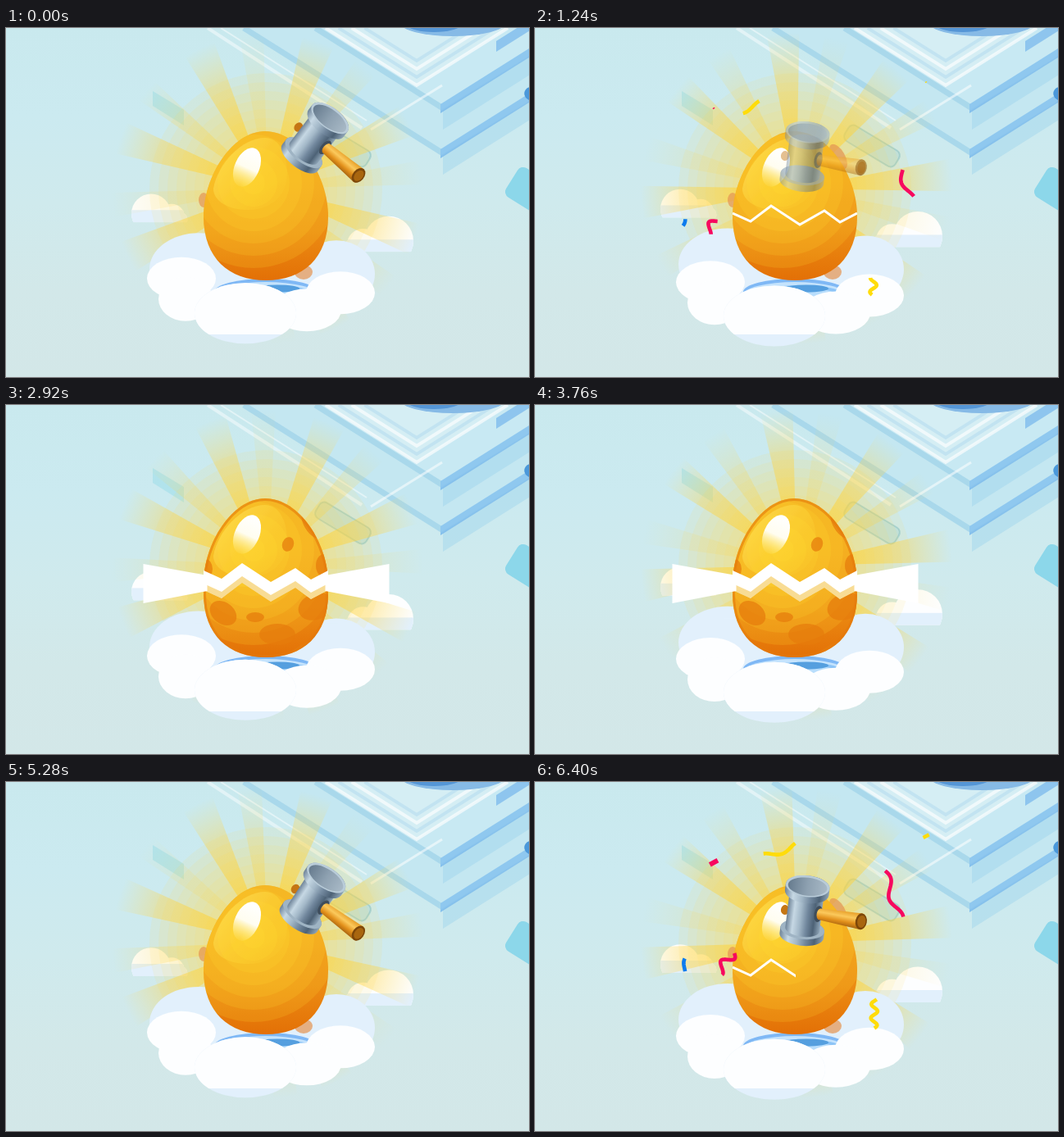
Recreate the animation shown at these times as an HTML page with a canvas. Size 638x426 px, loop 6480 ms.

```html
<!DOCTYPE html>
<html lang="en">
<head>
<meta charset="utf-8">
<title>Golden egg</title>
<style>
html, body { margin: 0; width: 100%; height: 100%; overflow: hidden; background: #cfe9ec; }
canvas { display: block; }
</style>
</head>
<body>
<canvas id="stage" width="638" height="426"></canvas>
<script>
const W = 638, H = 426;
const LOOP = 6480, SPIN = 2660, CYCLE = SPIN * 2;
const WHITE = '#fdfeff', PALE = '#e2f0fc';
const RED = '#f7085f', YELLOW = '#ffdc0a', BLUE = '#0c7bee';
const stage = document.getElementById('stage').getContext('2d');
let g = stage;

const rad = d => d * Math.PI / 180;
const clamp = (v, a = 0, b = 1) => Math.max(a, Math.min(b, v));
const span = (t, a, b) => clamp((t - a) / (b - a));
const smooth = u => u * u * (3 - 2 * u);
const wave = (t, peak) => Math.cos((t - peak) / SPIN * 2 * Math.PI);

function keyed(t, keys) {
  const i = keys.findIndex(k => k[0] > t);
  if (i === 0) return keys[0].slice(1);
  if (i < 0) return keys[keys.length - 1].slice(1);
  const a = keys[i - 1], b = keys[i], u = span(t, a[0], b[0]);
  return a.slice(1).map((v, k) => v + (b[k + 1] - v) * u);
}

function trace(points) {
  g.beginPath();
  points.forEach(([x, y]) => g.lineTo(x, y));
}

function fill(color, points) {
  g.fillStyle = color;
  trace(points);
  g.fill();
}

function stroke(color, width, points) {
  g.strokeStyle = color;
  g.lineWidth = width;
  trace(points);
  g.stroke();
}

function oval(color, x, y, rx, ry = rx, tilt = 0) {
  g.fillStyle = color;
  g.beginPath();
  g.ellipse(x, y, rx, ry, rad(tilt), 0, 7);
  g.fill();
}

function blend(x0, y0, x1, y1, ...stops) {
  const grad = g.createLinearGradient(x0, y0, x1, y1);
  stops.forEach((c, i) => grad.addColorStop(i / (stops.length - 1), c));
  return grad;
}

function within(draw) { g.save(); draw(); g.restore(); }

// ---------- backdrop ----------
const SLOPE = .63;

// both arms rise from the corner at (x, y) to the top and the right side
const corner = (x, y) => [[x - y / SLOPE, 0], [x, y], [x + y / SLOPE, 0]];

// right-hand side wall of a slab, hanging below its edge
const wall = (x, y, h) => {
  const end = y - (W - x) * SLOPE;
  return [[x, y], [W, end], [W, end + h], [x, y + h]];
};

function slab(x, y, top) {
  fill(top, corner(x, y));
  fill('rgba(150,208,236,.4)', wall(x, y + 4, 22));
  stroke('#a9d8eb', 7, corner(x, y).slice(0, 2));
  fill(blend(x, y, x + 8, y + 13, '#8fc8ef', '#4e97dc'), wall(x - 3, y - 5, 11));
}

function backdrop() {
  g.fillStyle = blend(0, 0, 0, H, '#c9e9ee', '#cbeaf0', '#cfeaed', '#d2e8e9', '#d3e7e8');
  g.fillRect(0, 0, W, H);

  slab(533, 153, '#c4e7f1');
  slab(533, 98, '#c8e9f3');
  fill('#d5eef4', corner(501, 70));
  for (let i = 0; i < 4; i++)
    stroke(i % 2 ? 'rgba(190,226,240,.8)' : 'rgba(255,255,255,.65)', 4, corner(501, 70 - i * 10));
  oval('#86bae6', 545, -6, 64, 16);
  oval('#5596d6', 522, -5, 34, 10);
  fill('#8ec5ee', wall(598, 16, 13));

  for (let i = 0; i < 2; i++)
    stroke('rgba(255,255,255,.45)', 4 - i * 2, [[246 + i * 16, 0], [434 + i * 6, 122 - i * 9]]);
  stroke('rgba(255,255,255,.55)', 3, [[445, 124], [532, 70]]);

  // loose tiles
  fill('rgba(130,212,226,.35)', [[179, 77], [217, 100], [217, 119], [179, 95]]);
  const tile = (x, y, w, h, tilt, color, edge) => within(() => {
    g.translate(x, y);
    g.rotate(rad(tilt));
    g.beginPath();
    g.roundRect(-w / 2, -h / 2, w, h, 7);
    g.fillStyle = color;
    g.fill();
    g.lineWidth = 2;
    g.strokeStyle = edge;
    g.stroke();
  });
  tile(411, 144, 72, 22, 31, 'rgba(100,180,200,.18)', 'rgba(95,175,195,.4)');
  tile(640, 199, 52, 40, 32, '#8cd7ea', '#8cd7ea');
  tile(642, 81, 18, 14, 32, '#4b98da', '#4b98da');
}

const scenery = document.createElement('canvas');
scenery.width = W;
scenery.height = H;
g = scenery.getContext('2d');
backdrop();
g = stage;

// ---------- light ----------
function glow(t) {
  const cx = 319, cy = 196, R = 190;
  for (let r = 142; r > 70; r -= 11) oval('rgba(255,216,84,.1)', 317, 197, r);
  const grad = g.createRadialGradient(cx, cy, 60, cx, cy, R);
  grad.addColorStop(0, 'rgba(255,210,50,.6)');
  grad.addColorStop(.6, 'rgba(255,212,66,.38)');
  grad.addColorStop(1, 'rgba(255,220,90,0)');
  g.fillStyle = grad;
  const ray = (deg, width, alpha) => {
    g.globalAlpha = alpha;
    g.beginPath();
    g.moveTo(cx, cy);
    g.arc(cx, cy, R, rad(deg - width / 2 - 90), rad(deg + width / 2 - 90));
    g.fill();
  };
  for (let i = 0; i < 8; i++) {
    const a = -26 + 45 * (i + t % SPIN / SPIN);
    ray(a, 12, 1);
    ray(a + 20, 9, i % 2 ? .55 : .3);
  }
  g.globalAlpha = 1;
}

// ---------- clouds ----------
// one dome with two smaller puffs on its inner side
function smallCloud(x, base, r, side) {
  within(() => {
    g.beginPath();
    for (const [shift, size] of [[0, 1], [1.05, .65], [1.5, .35]]) {
      const cx = x + side * shift * r;
      g.moveTo(cx + size * r, base);
      g.arc(cx, base - size * r * .45, size * r, 0, 7);
    }
    g.clip();
    g.fillStyle = WHITE;
    g.fillRect(0, base - r * 2, W, r * 2);
    g.fillStyle = PALE;
    g.fillRect(0, base - 15, W, 15);
    g.restore();
    g.save();
  });
}

function drift(t, draw) {
  within(() => {
    g.translate(0, wave(t, 320) * 4.5);
    draw();
  });
}

function farClouds() {
  const cut = (x, base, r, side) => within(() => {
    g.beginPath();
    g.rect(0, 0, W, base);
    g.clip();
    smallCloud(x, base, r, side);
  });
  cut(177, 234, 24, 1);
  cut(467, 270, 30, -1);
}

function backCloud() {
  oval(PALE, 235, 291, 60, 44);
  oval(PALE, 403, 297, 47, 41);
  g.fillStyle = PALE;
  g.fillRect(230, 262, 175, 62);
}

function frontCloud(t) {
  const left = wave(t, 1300) * 2.3, mid = wave(t, 1600) * 2.2;
  oval(WHITE, 214, 308 + left, 42, 26);
  oval(WHITE, 219, 333 + left, 33, 27);
  oval(WHITE, 408, 325 + mid, 42, 26);
  oval(WHITE, 367, 346 + mid, 42, 26);
  g.fillStyle = WHITE;
  g.fillRect(220, 328, 160, 22);
  oval(PALE, 292, 350 + mid, 62, 37);
  within(() => {
    g.beginPath();
    g.rect(0, 0, W, 374);
    g.clip();
    oval(WHITE, 292, 350 + mid, 62, 37);
  });
}

function dish() {
  oval('#7fb8f5', 317, 322, 63, 16);
  oval('#c4e3fd', 317, 325, 62, 15);
  oval('#8cc4f7', 324, 323, 48, 9);
  oval('#b9defc', 322, 326, 46, 9);
  oval('#559fdf', 331, 318, 27, 4.5);
}

// ---------- egg ----------
const shell = new Path2D('M316 126C358 126 393 181 393 230C393 281 362 308 317 308' +
  'C272 308 241 281 241 230C241 181 276 126 316 126Z');
const gloss = new Path2D('M316 134C334 134 343 155 343 178C343 205 322 222 295 222' +
  'C272 222 253 212 253 196C258 166 288 134 316 134Z');
const CUT = [[241, 226], [263, 236], [288, 217], [323, 240], [353, 223], [372, 237], [393, 226]];
const cutAt = dy => CUT.map(([x, y]) => [x, y + dy]);

function eggBody(rim) {
  within(() => {
    g.clip(shell);
    g.fillStyle = blend(0, 126, 0, 308, '#ee9a1a', '#f09a19', '#ec8c13', '#e37006');
    g.fillRect(230, 110, 180, 210);
    g.fillStyle = blend(262, 150, 330, 205, 'rgba(255,236,150,.6)', 'rgba(255,215,80,.4)', 'rgba(255,205,50,.15)');
    g.fill(gloss);
    for (let r = 104; r > 10; r -= 15) oval('rgba(255,224,52,.16)', 302, 189, r);
    if (rim) {
      g.strokeStyle = 'rgba(228,120,10,.6)';
      g.lineWidth = 6;
      g.stroke(shell);
    }
  });
  oval(blend(303, 148, 283, 192, '#ffffff', '#fffdf0', 'rgba(255,240,140,.15)'), 294, 170, 15, 25, 24);
}

const spots = list => list.forEach(s => oval('rgba(230,124,12,.72)', ...s));

function closedEgg() {
  // stains that show past the edge
  const stain = 'rgba(228,150,84,.72)';
  oval(stain, 241, 210, 6, 9);
  oval(stain, 370, 157, 8, 17, -30);
  oval(stain, 363, 298, 11, 9);
  eggBody(false);
}

function openEgg(u) {
  const half = (shift, edge, marks) => within(() => {
    trace([[230, edge], [230, 226 + shift], ...cutAt(shift), [405, 226 + shift], [405, edge]]);
    g.clip();
    g.translate(0, shift);
    eggBody(true);
    g.clip(shell);
    spots(marks);
  });
  half(-12 * u, 100, [[344, 182, 7, 9, 20], [373, 158, 9, 19, -32], [388, 208, 10, 14], [243, 212, 9, 12]]);
  half(0, 320, [[265, 254, 18, 13, 38], [304, 259, 11, 6], [331, 280, 22, 13], [378, 246, 22, 16, -20], [367, 298, 22, 8, -25]]);

  // gap: cream rim below, light above, beams to both sides
  const strip = (top, bottom) => [...cutAt(top * u), ...cutAt(bottom * u).reverse()];
  within(() => {
    g.clip(shell);
    fill('#f8dc94', strip(-11, 0));
  });
  fill('#ffffff', strip(-24, -8));
  for (const side of [-1, 1]) {
    const near = 317.5 + side * 72, far = near + side * 78 * u;
    fill('#ffffff', [[near, 218 - 10 * u], [far, 218 - 24 * u], [far, 218 + 24 * u], [near, 218 + 9 * u]]);
  }
}

function crack(u) {
  within(() => {
    g.beginPath();
    g.rect(241, 200, 152 * u, 60);
    g.clip();
    stroke('#ffffff', 3, CUT);
  });
}

// ---------- hammer ----------
// time around the cycle start, x, y, tilt
const POSES = [
  [-1020, 450, 248, -18], [-600, 333, 258, -18], [0, 377, 134, 37],
  [520, 435, 97, 95], [720, 435, 97, 95], [980, 329, 157, 7]
];

function drum(rx, ry, top, bottom) {
  g.fillStyle = blend(-rx, 0, rx, 0, '#6f8499', '#c6d8e4', '#a3b8c8', '#71879d', '#4d6276', '#8fa5b7');
  g.beginPath();
  g.ellipse(0, top, rx, ry, 0, Math.PI, 0);
  g.ellipse(0, bottom, rx, ry, 0, 0, Math.PI);
  g.fill();
}

function hammer(p) {
  const q = p > SPIN ? p - CYCLE : p;
  const alpha = span(q, -1020, -860) * (1 - span(q, 1100, 1360));
  if (!alpha) return;
  const [x, y, tilt] = keyed(q, POSES);
  within(() => {
    g.globalAlpha = alpha;
    g.translate(x, y);
    g.rotate(rad(tilt));
    oval('#c57614', -24, 2, 5, 6);
    drum(27, 12, 23, 31);
    oval('#9fb4c4', 0, 23, 27, 12);
    drum(21, 9, -18, 23);
    drum(27, 13, -30, -22);
    oval('#b9ccd9', 0, -30, 27, 13);
    oval(blend(-24, 0, 24, 0, '#667b8e', '#8ea1b1', '#a8b9c6'), 0, -29.5, 24, 11);
    g.translate(17, 2);
    g.rotate(rad(3));
    oval('#3f4d5b', 0, 0, 5, 10);
    g.fillStyle = blend(0, -9, 0, 10, '#e9a22c', '#fbc95c', '#e2901b', '#a5620f');
    g.beginPath();
    g.ellipse(2, 0, 4, 7, 0, Math.PI / 2, Math.PI * 1.5);
    g.ellipse(53, 0, 6, 10, 0, -Math.PI / 2, Math.PI / 2);
    g.fill();
    oval('#7d4709', 53, 0, 7, 10);
    oval('#a9660f', 53.5, 0, 5, 7.5);
  });
}

// ---------- confetti ----------
// colour, start, heading, length, sway, turns
const RIBBONS = [
  [RED, 418, 84, 72, 145, 5, 3],
  [YELLOW, 335, 72, 161, 98, 4, 2],
  [YELLOW, 415, 250, 92, 85, 4, 5],
  [RED, 250, 198, 128, 72, 6, 3],
  [BLUE, 187, 210, 105, 36, 3, 1]
];

function ribbons(p) {
  const head = span(p, 760, 1300), tail = span(p, 1020, 1360);
  if (head <= tail) return;
  g.lineJoin = 'round';
  for (const [color, x, y, heading, length, sway, turns] of RIBBONS) {
    const c = Math.cos(rad(heading)), s = Math.sin(rad(heading));
    const points = Array.from({ length: 41 }, (_, i) => {
      const u = tail + (head - tail) * i / 40;
      const along = u * length, off = sway * Math.sin(u * turns * 2 * Math.PI);
      return [x + along * c - off * s, y + along * s + off * c];
    });
    stroke(color, 4.6, points);
  }
  g.lineJoin = 'miter';
}

// colour, place, size, moment of full size
const CHIPS = [
  [BLUE, 413, 41, 6, 520], [BLUE, 213, 186, 10, 520], [BLUE, 404, 307, 7, 520],
  [RED, 218, 98, 12, 1060], [YELLOW, 477, 66, 8, 1080]
];

function chips(p) {
  for (const [color, x, y, size, peak] of CHIPS) {
    const s = size * clamp(1 - Math.abs(p - peak) / 230);
    within(() => {
      g.translate(x, y);
      g.rotate(rad(-28));
      g.fillStyle = color;
      g.fillRect(-s / 2, -s / 4, s, s * .55);
    });
  }
}

// ---------- scene ----------
function render(now) {
  const t = now % LOOP, p = t % CYCLE;
  g.drawImage(scenery, 0, 0);
  drift(t, farClouds);
  glow(t);
  drift(t, backCloud);
  dish();
  const open = smooth(span(p, 1400, 1560)) * (1 - smooth(span(p, 4160, 4280)));
  if (open) openEgg(open);
  else closedEgg();
  frontCloud(t);
  if (!open && p < SPIN) crack(span(p, 1000, 1160));
  hammer(p);
  chips(p);
  ribbons(p);
}

const start = performance.now();
function tick() {
  render(performance.now() - start);
  requestAnimationFrame(tick);
}
tick();
</script>
</body>
</html>
```
